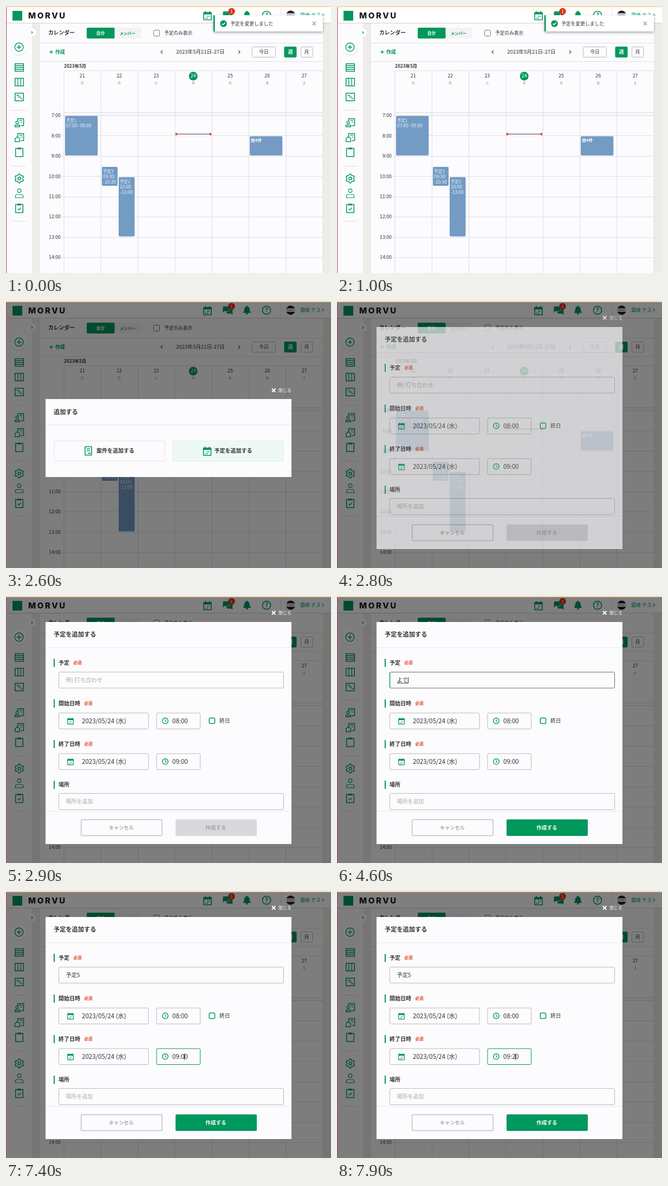
An HTML page that plays this animation: 600 px wide and 493 px high, repeating every 8000 ms.

```html
<!DOCTYPE html>
<html lang="ja">
<head>
<meta charset="utf-8">
<title>カレンダー</title>
<style>
html, body { margin: 0; width: 100%; height: 100%; overflow: hidden; background: #fcfbfe }
svg { display: block; width: 600px; height: 493px; font-family: "Noto Sans CJK JP", "Noto Sans CJK", sans-serif }
text { white-space: pre }
</style>
</head>
<body>
<svg id="stage" viewBox="0 0 600 493"></svg>
<script>
const GREEN = '#00985c', LINE = '#dedde1', BORDER = '#b9b9bd', INK = '#333', BLUE = '#739bc4', PAPER = '#fcfbfe';
const LOOP = 8000;

const rect = (x, y, w, h, fill, more = '') =>
  `<rect x="${x}" y="${y}" width="${w}" height="${h}" fill="${fill}" ${more}/>`;
const box = (x, y, w, h, color = BORDER, more = '') =>
  rect(x, y, w, h, 'none', `stroke="${color}" rx="2" ${more}`);
const text = (x, y, size, str, fill = INK, more = '') =>
  `<text x="${x}" y="${y}" font-size="${size}" fill="${fill}" ${more}>${str}</text>`;
const bold = (x, y, size, str, fill = INK, more = '') => text(x, y, size, str, fill, 'font-weight="700" ' + more);
const path = (d, color = GREEN, width = 1.5, fill = 'none', more = '') =>
  `<path d="${d}" stroke="${color}" stroke-width="${width}" fill="${fill}" stroke-linejoin="round" ${more}/>`;
const circle = (x, y, r, fill, more = '') => `<circle cx="${x}" cy="${y}" r="${r}" fill="${fill}" ${more}/>`;
const ring = (x, y, r, width = 1.5, fill = 'none') => circle(x, y, r, fill, `stroke="${GREEN}" stroke-width="${width}"`);
const group = (id, body) => `<g id="${id}">${body}</g>`;
const move = (x, y, body, scale = 1) => `<g transform="translate(${x} ${y}) scale(${scale})">${body}</g>`;
const middle = 'text-anchor="middle"';

// Icons are centred on their own origin.
const calendarIcon = (x, y, scale) => move(x, y,
  path('M-7 -6H7V7.5H-7Z', GREEN, 1.6) + rect(-7, -6, 14, 3.5, GREEN) +
  path('M-4 -8.5v3M4 -8.5v3', GREEN, 1.8) +
  path('M-4 4.5h2M-1 4.5h2M-1 1h2M2 1h2', GREEN, 1.6), scale);
const clipboard = (y, inner = '') => move(24.5, y,
  path('M-6.8 -7H6.8V8H-6.8Z') + rect(-3.5, -8.5, 7, 3.2, GREEN) + inner);
const clock = y => ring(294, y, 5.2, 1.4) + path(`M294 ${y - 3}v3.4l2 1`, GREEN, 1.2);
const closeLabel = y => path(`M491 ${y - 3.2}l6.4 6.4m0 -6.4l-6.4 6.4`, '#fff', 2) + text(503, y + 3, 8, '閉じる', '#fff');

function header() {
  return rect(0, 0, 600, 31, '#fff') + rect(0, 31, 600, 1.2, '#d8d6d8') +
    rect(12, 9, 18, 18, GREEN) +
    `<text x="41" y="22.5" font-size="15" font-weight="800" letter-spacing="2.6" fill="#191919" style="font-family:Inter,sans-serif">MORVU</text>` +
    calendarIcon(372, 18, 1) +
    path('M408 14h7q3 0 3 3v8l-2.5 -2h-6q-2.5 0 -2.5 -2z', GREEN, .5, GREEN) +
    path('M402.5 9.5h7q3.5 0 3.5 4.5t-3.5 5h-6l-3.5 2.8v-7.5q0 -4.8 2.5 -4.8z', '#fff', .8, GREEN) +
    circle(416.5, 10, 6.2, '#e0341d') + text(416.5, 13, 8, '1', '#fff', middle) +
    path('M438 21.5q2.3 -2 2.3 -6q0 -4.5 4.5 -5.2q4.5 .7 4.5 5.2q0 4 2.3 6z', GREEN, 1, GREEN) +
    circle(444.8, 23.5, 1.8, GREEN) + circle(444.8, 10, 1.3, GREEN) +
    ring(481, 17, 7.6) + bold(481, 21, 11, '?', GREEN, middle) +
    rect(507, 2, 1, 29, '#e6e5e8') +
    circle(525.5, 17, 8.5, '#222') + rect(517, 13.5, 17, 6.5, '#e8e8ea') +
    path('M519 16.8h13', '#555', 1.4, 'none', 'stroke-dasharray="2 1"') +
    text(543, 20.3, 9, '霜峰 テスト', GREEN);
}

function gear(x, y) {
  const points = Array.from({ length: 24 }, (_, i) => {
    const r = i % 4 < 2 ? 8.3 : 6.3, a = (i - .5) * Math.PI / 12 - Math.PI / 2;
    return `${(r * Math.cos(a)).toFixed(2)} ${(r * Math.sin(a)).toFixed(2)}`;
  });
  return move(x, y, path(`M${points.join('L')}Z`) + ring(0, 0, 2.5));
}

function sidebar() {
  const rules = [192, 295, 397].map(y => rect(11, y, 27, 1, LINE)).join('');
  const frame = (y, inner) => move(24.5, y, path('M-7.8 -7H7.8V7H-7.8Z') + path(inner, GREEN, 1.3));
  const doc = (y, front) => move(24.5, y, path('M-3 -2V-7.5H8V5.5H3') + path('M0 -4.3H5.5M2.5 -1H5.5', GREEN, 1.2) + front);
  return rect(48, 32, 15, 461, '#eeece9') + rect(585, 32, 15, 461, '#eeece9') +
    circle(48, 49, 7.5, '#fff') + path('M46.8 46.8l2.2 2.2l-2.2 2.2', GREEN, 1.2) +
    circle(24, 77, 14.5, '#e3e2e5') + circle(24, 76, 14, '#fff') +
    ring(24, 76, 7.8, 1.4) + path('M19.8 76h8.4M24 71.8v8.4') +
    rules +
    frame(113.5, 'M-8 -3.5H8M-8 0H8M-8 3.5H8') +
    frame(140.5, 'M-2.7 -7V7M2.7 -7V7') +
    frame(168, 'M-5 -3H0M-2 0H3M2 3H5.5') +
    doc(215.5, ring(-4, -.5, 2.4, 1.4, '#fff') + path('M-8 7.5V4.5H1V7.5Z', GREEN, 1.4, '#fff')) +
    doc(243, path('M-7.8 7.5V2L-3.5 -1.8L.8 2V7.5Z', GREEN, 1.4, '#fff')) +
    clipboard(270) + gear(24.5, 318.5) +
    ring(24.5, 341, 3.3, 1.2) + path('M17.5 354v-3q0 -3 3 -3h8q3 0 3 3v3z', GREEN, 1.2) +
    clipboard(373.5, path('M-3 1l2.2 2.2L3 -1', GREEN, 1.4));
}

function event(x, y, w, h, title, ...lines) {
  return rect(x, y, w, h, BLUE, 'rx="2"') +
    text(x + 2, y + 10.5, 7.6, title, '#eef4fa') +
    lines.map((line, i) => text(x + 2, y + 20.9 + i * 10.4, 8.4, line, '#eef4fa')).join('');
}

function calendar() {
  const step = 68.3, left = 106.6, hour = 37.45;
  let s = bold(78, 53, 9.8, 'カレンダー') +
    rect(149, 40, 101, 20, '#f3f2f5', 'rx="2"') + rect(149, 40, 51.5, 20, GREEN, 'rx="2"') +
    bold(174.5, 53, 7.7, '自分', '#fff', middle) + bold(224.5, 53, 7.3, 'メンバー', GREEN, middle) +
    box(272.5, 44.5, 11, 11, '#777') + text(292, 53.2, 8.7, '予定のみ表示') +
    rect(63, 68, 522, 1, LINE) +
    path('M80.5 85h6M83.5 82v6', GREEN, 1.4) + bold(91, 88, 9, '作成', GREEN) +
    path('M289 82l-3 3l3 3M429 82l3 3l-3 3', '#444', 1.1) + text(314, 88.2, 9.6, '2023年5月21日-27日') +
    box(454.5, 75.5, 43, 19) + text(476, 88.2, 8.8, '今日', INK, middle) +
    rect(513.5, 75, 23, 20, GREEN, 'rx="2"') + bold(525, 88.3, 9, '週', '#fff', middle) +
    box(544.5, 75.5, 21.5, 19) + text(555, 88.3, 9, '月', INK, middle) +
    rect(63, 102, 522, 1, LINE) +
    bold(107, 114, 8.3, '2023年5月') +
    rect(left, 119, 478, 1, LINE) + rect(left, 196.5, 478, 1, '#d5d4d8') + rect(left, 201.5, 478, 1, LINE);
  [...'日月火水木金土'].forEach((day, i) => {
    const x = left + step * (i + .5), today = i === 3;
    if (today) s += circle(x, 129.5, 8, GREEN);
    s += text(x, 132.3, 8.8, 21 + i, today ? '#fff' : INK, middle) + text(x, 143.5, 6, day, '#888', middle);
  });
  for (let i = 0; i < 8; i++) {
    const y = 202 + hour * i;
    s += rect(left + step * i, 119, 1, 374, LINE) +
      rect(103, Math.round(y), 482, 1, LINE) + text(101, y + 3.2, 8.8, `${7 + i}:00`, INK, 'text-anchor="end"');
  }
  return s +
    event(109, 203, 60.3, 73, '予定1', '07:00 -09:00') +
    event(177, 297, 29, 35, '予定3', '09:30', '-10:30') +
    event(208, 316, 29.5, 109.5, '予定2', '10:00', '-13:00') +
    rect(450, 240.5, 60.3, 35.5, BLUE, 'rx="2"') + bold(452, 251, 7.8, '他4件', '#fff') +
    path('M314 236.5H378', '#4a3a44', 1) +
    path('M313 233.8l5 2.7l-5 2.7zM379 233.8l-5 2.7l5 2.7z', 'none', 0, '#e0341d');
}

function toast() {
  return rect(383, 17, 202, 30, '#fff', 'rx="2" filter="url(#shadow)"') + rect(383, 17, 2.5, 30, GREEN) +
    circle(401.5, 32.5, 6.3, GREEN) + path('M398.5 32.6l2.2 2.2l4 -4.2', '#fff', 1.5) +
    text(414, 35.6, 8.8, '予定を変更しました') + path('M566 29l6 6.6m0 -6.6l-6 6.6', '#aaa', 1.7);
}

function choiceDialog() {
  return closeLabel(165) + rect(73, 181, 454, 144, PAPER) +
    bold(88, 209, 11.2, '追加する') + rect(73, 228, 454, 1, '#e8e7ea') +
    box(89, 258.5, 204, 37, '#e4e3e7', 'rx="3"') +
    rect(308, 258.5, 204, 37, PAPER, 'id="hover" rx="3" stroke="#e4e3e7"') +
    path('M146 269h12v15.5h-12zM149 273h6M149 276.5h6', GREEN, 1.6) + path('M152 281h4', GREEN, 2.2) +
    bold(167, 280.3, 10, '案件を追加する') +
    calendarIcon(371.5, 277.5, 1) + bold(384.5, 280.3, 10, '予定を追加する');
}

function formDialog() {
  const section = (y, name, required) => rect(88, y, 2, 15, GREEN) + bold(97, y + 11.3, 10, name) +
    (required ? bold(97 + name.length * 10 + 7.5, y + 10.2, 7.5, '必須', '#e0451f') : '');
  const date = y => box(97.5, y, 165.5, 29.5) + calendarIcon(119, y + 15, .75) + text(140, y + 18.7, 11.5, '2023/05/24 (水)');
  return closeLabel(31) + rect(73, 48, 454, 410, PAPER) +
    bold(88, 75.3, 11.2, '予定を追加する') + rect(73, 95, 454, 1, '#e8e7ea') +
    section(116, '予定', true) + box(97.5, 140.5, 415, 29.5, BORDER, 'id="titleBox"') +
    rect(96.8, 141.5, 1.4, 27.5, GREEN, 'id="titleEdge"') +
    text(110.5, 159, 10.3, '例) 打ち合わせ', '#aaa', 'id="hint"') +
    text(110.5, 159, 10.2, '', INK, 'id="titleText"') +
    rect(111, 160.3, 0, 1, INK, 'id="underline"') + rect(0, 150, 1, 11, '#222', 'id="titleCaret"') +
    section(191, '開始日時', true) + date(216) + box(278, 216, 80.5, 29.5) + clock(230.5) + text(307, 234.7, 11.5, '08:00') +
    box(375.3, 225.3, 10.2, 10.2, GREEN, 'stroke-width="1.5"') + text(394, 234, 9.7, '終日') +
    section(266, '終了日時', true) + date(291) + box(278, 291, 80.5, 29.5, BORDER, 'id="endBox"') + clock(305.7) +
    text(307, 309.7, 11.5, '09:00', INK, 'id="endText"') + rect(0, 300, 1, 12, '#222', 'id="endCaret"') +
    section(341, '場所') + box(97.5, 364.5, 415, 30) + text(110.5, 383, 10, '場所を追加', '#aaa') +
    rect(73, 397, 454, 1, '#e8e7ea') +
    box(138.7, 413, 149.3, 29.5, '#c2c1c5', 'stroke-width="1.5"') + bold(213, 430.8, 9.2, 'キャンセル', '#aaa', middle) +
    rect(313, 412.5, 150, 30.5, '#d9d8db', 'rx="2"') +
    rect(313, 412.5, 150, 30.5, GREEN, 'rx="2" id="enabled"') +
    bold(387.5, 431, 9.6, '作成する', '#a6a5a8', 'id="createText" ' + middle);
}

const stage = document.getElementById('stage');
stage.innerHTML =
  '<filter id="shadow" x="-10%" y="-30%" width="120%" height="180%"><feDropShadow dx="0" dy="2" stdDeviation="2.5" flood-opacity=".35"/></filter>' +
  rect(0, 0, 600, 493, PAPER) + sidebar() + calendar() + header() + group('toast', toast()) +
  rect(0, 0, 600, 493, '#000', 'id="shade"') + group('choice', choiceDialog()) + group('form', formDialog()) +
  rect(0, 0, 600, 2, '#fbd9a8') + rect(0, 2, 1, 491, '#a8405a');

const el = {};
stage.querySelectorAll('[id]').forEach(node => el[node.id] = node);

// Each track lists [start time, value].
const tracks = {
  title: [[0, ''], [4400, 'y'], [4500, 'よ'], [4600, 'よて'], [4700, 'よてい'], [4800, '予定'], [5200, '予定5']],
  titleCaret: [[0, 0], [3600, 1], [4000, 0], [4400, 1], [5700, 0], [6200, 1], [6700, 0]],
  titleBorder: [[0, BORDER], [3300, '#85858a'], [3600, '#66706c'], [7000, BORDER]],
  end: [[0, '09:00'], [7500, '09:0'], [7700, '09:20']],
  endCaret: [[0, 0], [7000, 4], [7500, 3], [7700, 4]],
  endBorder: [[0, BORDER], [6300, '#85858a'], [7000, GREEN]]
};
const at = (name, t) => tracks[name].findLast(([start]) => start <= t)[1];
const ramp = (t, from, to) => Math.min(1, Math.max(0, (t - from) / (to - from)));
const show = (node, alpha) => node.setAttribute('opacity', +alpha);
const paint = (node, color) => node.setAttribute('stroke', color);
const widthOf = (node, count) => count ? node.getSubStringLength(0, count) : 0;

function draw(now) {
  const t = Math.floor(now % LOOP / 100) * 100;
  const dimmed = t >= 1800;
  show(el.toast, !dimmed);
  show(el.shade, dimmed ? .5 : 0);
  show(el.choice, dimmed ? (.7 + .3 * ramp(t, 1800, 2000)) * (1 - ramp(t, 2600, 2800)) : 0);
  show(el.form, ramp(t, 2600, 2900));

  const hovered = t >= 2400;
  el.hover.setAttribute('fill', hovered ? '#eef9f6' : PAPER);
  paint(el.hover, hovered ? '#dcefe8' : '#e4e3e7');

  const title = at('title', t);
  el.titleText.textContent = title;
  const titleWidth = widthOf(el.titleText, title.length);
  show(el.hint, !title);
  show(el.titleCaret, at('titleCaret', t));
  el.titleCaret.setAttribute('x', 110.5 + titleWidth);
  el.underline.setAttribute('width', t < 5700 ? titleWidth : 0);
  paint(el.titleBox, at('titleBorder', t));
  show(el.titleEdge, t >= 3600 && t < 7000);

  el.endText.textContent = at('end', t);
  const endCaret = at('endCaret', t);
  show(el.endCaret, endCaret > 0);
  el.endCaret.setAttribute('x', 306.5 + widthOf(el.endText, endCaret));
  paint(el.endBox, at('endBorder', t));

  const enabled = ramp(t, 4300, 4600);
  show(el.enabled, enabled);
  el.createText.setAttribute('fill', enabled ? '#fff' : '#a6a5a8');
}

function tick(now) {
  draw(now);
  requestAnimationFrame(tick);
}
draw(0);
requestAnimationFrame(tick);
</script>
</body>
</html>
```
